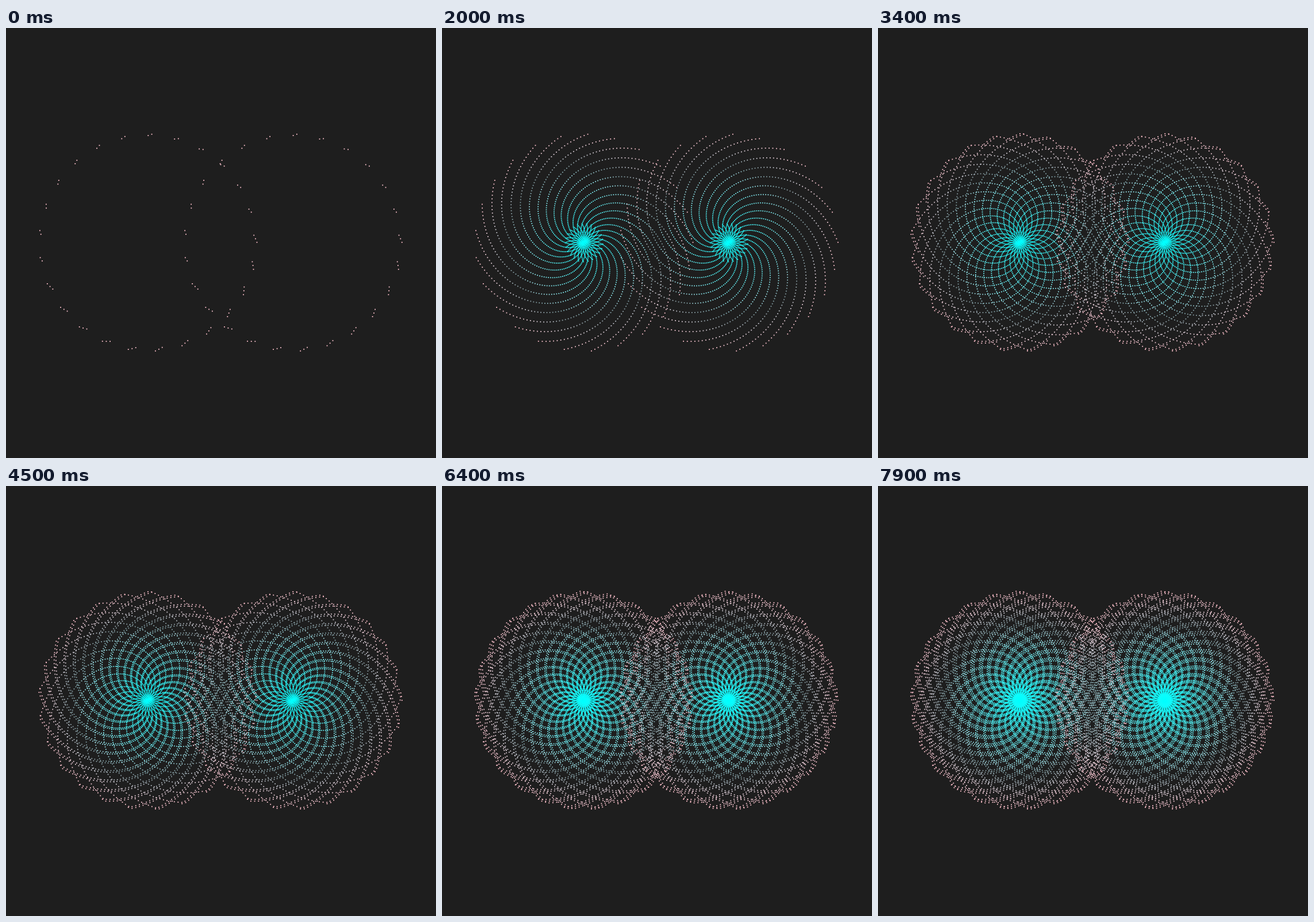
An HTML page with a canvas that plays this animation: 748x748 px, repeating every 8000 ms.

```html
<!DOCTYPE html>
<html lang="en">
<head>
<meta charset="utf-8">
<title>Twin spirals</title>
<style>
html, body { margin: 0; width: 100%; height: 100%; overflow: hidden; background: #1e1e1e; }
canvas { display: block; }
</style>
</head>
<body>
<canvas id="stage" width="748" height="748"></canvas>
<script>
const ctx = document.getElementById('stage').getContext('2d');
const LOOP = 8000, TICK = 100;
const RADIUS = 190, SWEEP = 1958, TURN = 0.25;   // SWEEP: dots from rim to centre
const CENTERS = [246.5, 498.8], CY = 372.8, SIZE = 1.8;
const CYAN = [0, 255, 255], PINK = [255, 192, 203];

// [tick, radial distance travelled so far]
const PACE = [[0, 6], [10, 102], [20, 224], [34, 393], [39, 468], [79, 963]];

const mix = (a, b, f) => a + (b - a) * f;

function travelAt(tick) {
  const i = PACE.findIndex(([t]) => t > tick);
  const [[t0, d0], [t1, d1]] = i < 0 ? PACE.slice(-2) : [PACE[i - 1], PACE[i]];
  return mix(d0, d1, (tick - t0) / (t1 - t0));
}

// Cyan at the centre to pink at the rim, with a dimmer ring in between.
function shade(r) {
  const light = 1 - 0.28 * Math.exp(-(((r - 134) / 15) ** 2));
  return `rgb(${CYAN.map((c, i) => Math.round(mix(c, PINK[i], r / RADIUS) * light))})`;
}
const colors = Array.from({ length: RADIUS + 1 }, (_, r) => shade(r));

// The signed radius swings between +RADIUS and -RADIUS.
function radiusAt(k) {
  const phase = k % (4 * SWEEP);
  return RADIUS * (Math.abs(phase - 2 * SWEEP) / SWEEP - 1);
}

function draw(tick) {
  const count = Math.round(travelAt(tick) / RADIUS * SWEEP);
  ctx.fillStyle = '#1e1e1e';
  ctx.fillRect(0, 0, 748, 748);
  for (let k = 0; k < count; k++) {
    const r = radiusAt(k);
    const x = r * Math.cos(TURN * k) - SIZE / 2;
    const y = CY + r * Math.sin(TURN * k) - SIZE / 2;
    ctx.fillStyle = colors[Math.round(Math.abs(r))];
    for (const cx of CENTERS) ctx.fillRect(cx + x, y, SIZE, SIZE);
  }
}

const start = performance.now();
let shown = -1;
function frame() {
  const tick = Math.floor((performance.now() - start) % LOOP / TICK);
  if (tick !== shown) draw(shown = tick);
  requestAnimationFrame(frame);
}
frame();
</script>
</body>
</html>
```
